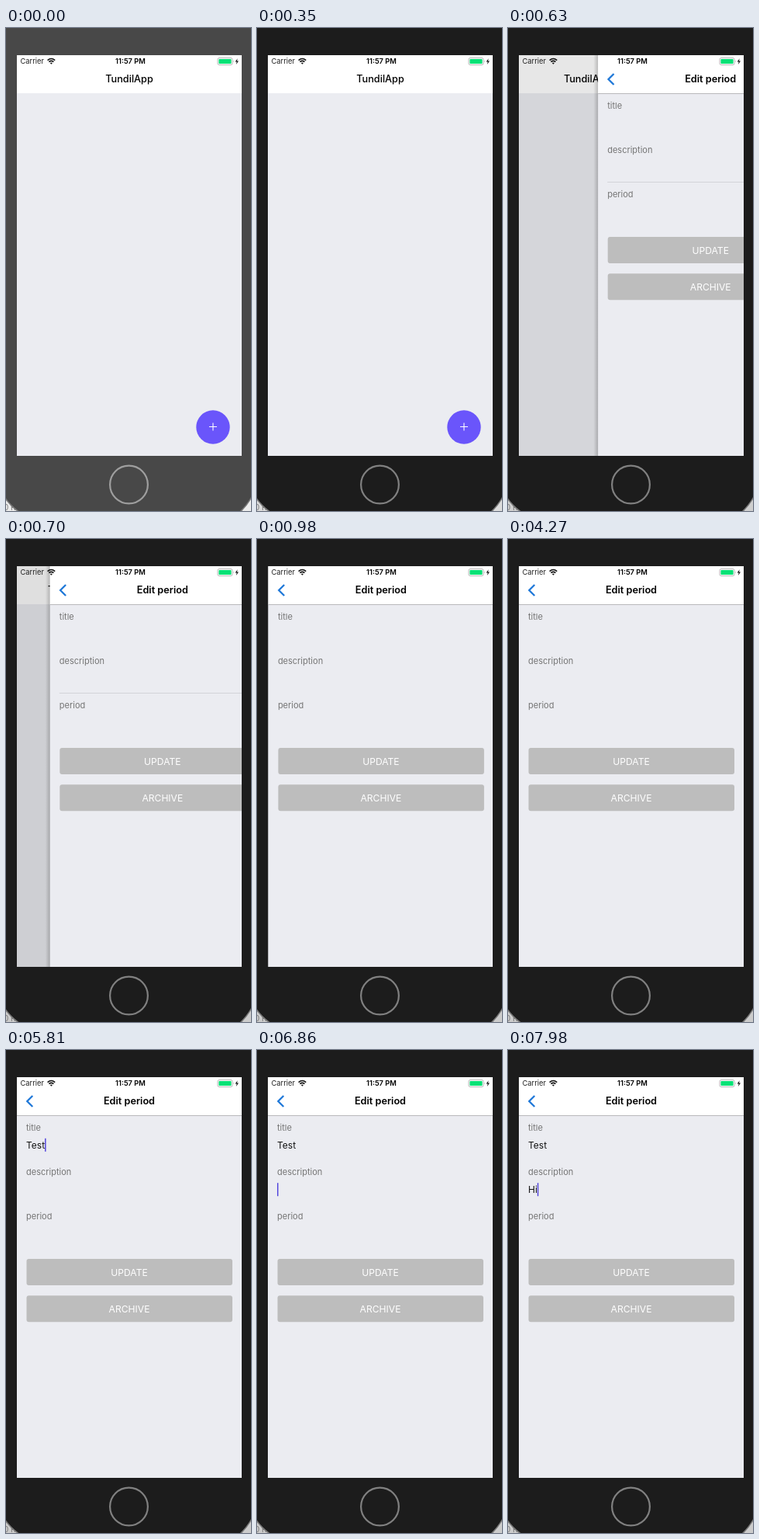
An HTML page for the animation above (8 s loop, 316x622 px).

```html
<!DOCTYPE html>
<html lang="en">
<head>
<meta charset="utf-8">
<style>
html, body { margin: 0; width: 100%; height: 100%; overflow: hidden; background: #ccc; }
svg { display: block; width: 316px; height: 622px; font-family: Inter, sans-serif; }
.head { font-size: 12.7px; text-anchor: middle; }
.label { font-size: 11px; fill: #757575; }
.input { font-size: 12px; fill: #111; }
.button rect { fill: #bdbdbd; }
.button text { font-size: 12.1px; fill: #fff; text-anchor: middle; }
.status { font-size: 9.3px; fill: #222; }
</style>
</head>
<body>
<svg viewBox="0 0 316 622">
  <defs>
    <clipPath id="screen"><rect x="14" y="35" width="290" height="516"/></clipPath>
    <linearGradient id="shade">
      <stop offset="0" stop-color="#000" stop-opacity="0"/>
      <stop offset="1" stop-color="#000" stop-opacity=".2"/>
    </linearGradient>
  </defs>

  <rect id="desk" width="316" height="622"/>
  <text x="-3" y="621" font-size="10" fill="#777">0 R</text>
  <path id="body" d="M-2 -2H318V602Q311 615 301 624H18Q6 616 -2 604Z" stroke="#777" stroke-width="1.6"/>
  <circle id="homeKey" cx="158.5" cy="588" r="24.4" fill="none" stroke-width="2.2"/>

  <g clip-path="url(#screen)">
    <g id="list">
      <rect x="14" y="35" width="380" height="516" fill="#ebecf1"/>
      <rect x="14" y="35" width="380" height="49" fill="#fff"/>
      <text class="head" x="159" y="70.3" font-weight="500">TundilApp</text>
      <circle cx="267" cy="514" r="21.7" fill="#6a55fb"/>
      <path d="M262 513.5h10M267 508.5v10" stroke="#fff" stroke-width="1.1"/>
    </g>
    <rect id="dim" x="14" y="35" width="290" height="516"/>

    <g id="card">
      <rect x="8" y="35" width="6" height="516" fill="url(#shade)"/>
      <rect x="14" y="35" width="290" height="516" fill="#ebecf1"/>
      <rect x="14" y="35" width="290" height="49" fill="#fff"/>
      <rect x="14" y="84" width="290" height="1" fill="#b8b8bb"/>
      <path d="M34.3 59L27.3 66L34.3 73" fill="none" stroke="#1f78d8" stroke-width="2.3"/>
      <text class="head" x="159" y="70.3" font-weight="600" font-size="12.5">Edit period</text>
      <text class="label" x="26" y="103.5">title</text>
      <text class="label" x="26" y="160.8">description</text>
      <text class="label" x="26" y="218">period</text>
      <rect id="rule" x="26" y="198" width="266" height="1" fill="#d3d4d9"/>
      <text class="input" id="title" x="26" y="126.6"></text>
      <text class="input" id="about" x="26" y="184"></text>
      <rect id="caret" x="26" width="1.5" height="17" fill="#5548dd"/>
      <g class="button">
        <rect x="26.5" y="269" width="265.5" height="34" rx="3"/>
        <text x="159" y="290.9">UPDATE</text>
        <rect x="26.5" y="316.3" width="265.5" height="34" rx="3"/>
        <text x="159" y="338.2">ARCHIVE</text>
      </g>
    </g>

    <g class="status">
      <text x="18.5" y="46.3">Carrier</text>
      <text x="160.5" y="46.3" text-anchor="middle" font-weight="600" fill="#000">11:57 PM</text>
      <g fill="none" stroke="#111" stroke-width="1.6">
        <path d="M53.6 41.6Q58.4 37.4 63.2 41.6"/>
        <path d="M55.4 43.7Q58.4 41.2 61.4 43.7"/>
      </g>
      <path d="M56.8 45Q58.4 43.8 60 45L58.4 46.8Z" fill="#111"/>
      <rect x="273" y="38.5" width="19" height="9" rx="2" fill="#fff" stroke="#a5a5a5" stroke-width=".8"/>
      <rect x="274.4" y="39.9" width="16.2" height="6.2" rx=".8" fill="#08e276"/>
      <path d="M293.3 41.4q1.3 1.5 0 3z" fill="#a5a5a5"/>
      <path d="M298.7 39.2L295.6 43.6H297.7L296.8 47L300 42.4H297.9Z" fill="#111"/>
    </g>
  </g>
</svg>
<script>
const $ = id => document.getElementById(id);
const LOOP = 8000, TICK = 70, WIDTH = 290;
const PUSH = { start: 512, length: 560 };
const FIELDS = [
  { id: "title", text: "Test", focus: 4480, keys: [4830, 4970, 5110, 5320], y: 113.8 },
  { id: "about", text: "Hi", focus: 6510, keys: [7630, 7840], y: 171.2 }
];

const clamp = v => Math.max(0, Math.min(1, v));
const mix = (a, b, k) => Math.round(a + (b - a) * k);
const grey = (a, b, k) => `rgb(${Array(3).fill(mix(a, b, k))})`;
const bez = (a, b, s) => 3 * a * s * (1 - s) ** 2 + 3 * b * s * s * (1 - s) + s ** 3;

function ease(u) {
  if (u <= 0 || u >= 1) return clamp(u);
  let lo = 0, hi = 1;
  for (let i = 0; i < 24; i++) {
    const s = (lo + hi) / 2;
    if (bez(.2833, .3183, s) < u) lo = s; else hi = s;
  }
  return bez(.99, .99, lo);
}

function drawFields(t) {
  let active = null;
  for (const f of FIELDS) {
    const typed = f.keys.filter(k => k <= t);
    $(f.id).textContent = f.text.slice(0, typed.length);
    if (t >= f.focus) active = { f, last: typed.length ? typed.at(-1) : f.focus };
  }
  const lit = active && (t - active.last) % 1000 < 600;
  $("caret").setAttribute("opacity", lit ? 1 : 0);
  if (!active) return;
  const node = $(active.f.id);
  $("caret").setAttribute("x", 26 + (node.textContent ? node.getComputedTextLength() : 0));
  $("caret").setAttribute("y", active.f.y);
}

function draw(t) {
  const wake = clamp(t / 210);
  $("body").setAttribute("fill", grey(72, 28, wake));
  $("homeKey").setAttribute("stroke", grey(158, 128, wake));
  $("desk").setAttribute("fill", grey(236, 204, clamp(t / 700)));

  const p = ease((t - PUSH.start) / PUSH.length);
  $("list").setAttribute("transform", `translate(${-.3 * WIDTH * p})`);
  $("card").setAttribute("transform", `translate(${WIDTH * (1 - p)})`);
  $("card").setAttribute("visibility", p > 0 ? "visible" : "hidden");
  $("dim").setAttribute("opacity", .145 * p);
  $("rule").setAttribute("opacity", p < .98 ? 1 : 0);
  drawFields(t);
}

function frame(now) {
  draw(Math.floor(now % LOOP / TICK) * TICK);
  requestAnimationFrame(frame);
}
draw(0);
requestAnimationFrame(frame);
</script>
</body>
</html>
```
